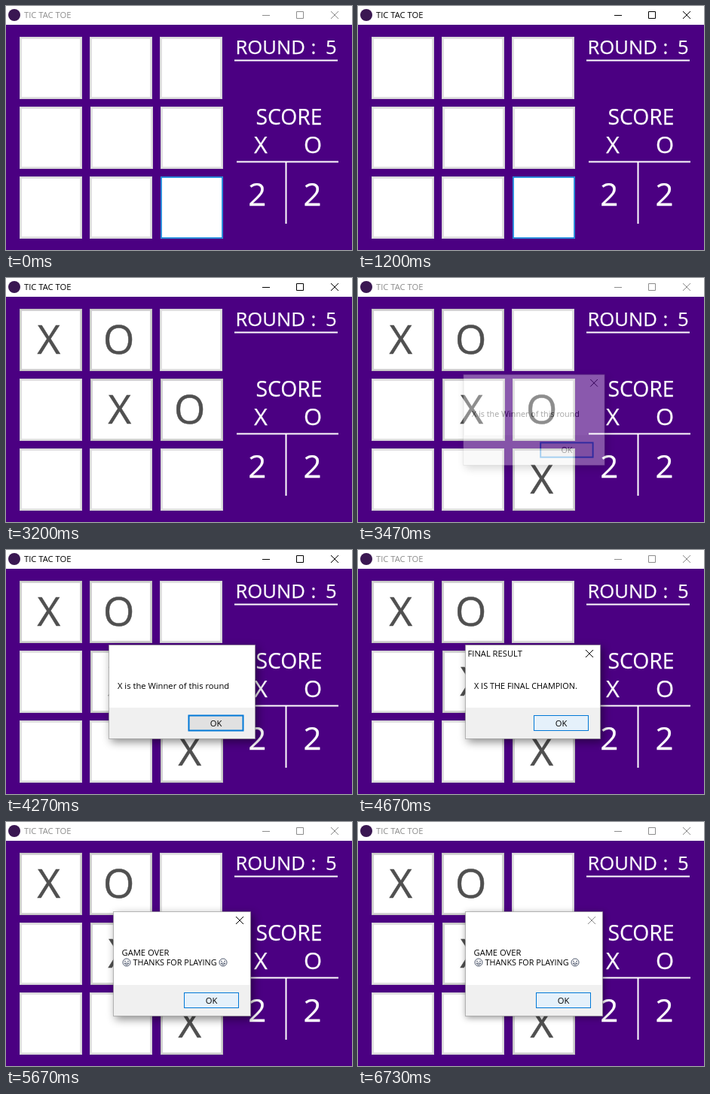
Recreate the animation shown at these times as an HTML page. Size 459 by 325 pixels, loop 6.79 s.

```html
<!DOCTYPE html>
<html lang="en">
<head>
<meta charset="utf-8">
<title>TIC TAC TOE</title>
<style>
html, body { margin: 0; width: 100%; height: 100%; overflow: hidden; background: #4b0082; }
svg { display: block; width: 459px; height: 325px; font-family: "Open Sans", "Noto Sans", sans-serif; }
.small { font-size: 11.2px; }
.mark { font-size: 53px; fill: #505050; stroke: #505050; stroke-width: .5; text-anchor: middle; }
.board { fill: #fff; stroke: #fff; stroke-width: .25; }
.mid { text-anchor: middle; }
.dialog { filter: drop-shadow(3px 4px 6px rgba(0, 0, 0, .45)); }
</style>
</head>
<body>
<svg id="stage" viewBox="0 0 459 325"></svg>
<script>
const stage = document.getElementById('stage');
const LOOP = 6790;
const TICK = 200 / 3;

function add(parent, tag, attrs = {}, text) {
  const el = document.createElementNS('http://www.w3.org/2000/svg', tag);
  for (const k in attrs) el.setAttribute(k, attrs[k]);
  if (text) el.textContent = text;
  parent.append(el);
  return el;
}
const rect = (p, x, y, width, height, fill, more) =>
  add(p, 'rect', { x, y, width, height, fill, ...more });
const label = (p, x, y, text, cls, more) =>
  add(p, 'text', { x, y, class: cls, ...more }, text);
const cross = (p, x, y, r = 5) =>
  add(p, 'path', { d: `M${x - r} ${y - r}l${2 * r} ${2 * r}m0 ${-2 * r}l${-2 * r} ${2 * r}`, fill: 'none', stroke: '#000' });

// Window
rect(stage, 0, 0, 459, 325, '#4b0082');
rect(stage, 0, 0, 459, 25, '#fff');
add(stage, 'circle', { cx: 11, cy: 12, r: 8, fill: '#3a1752' });
const caption = label(stage, 24, 16, 'TIC TAC TOE', 'small');
const controls = add(stage, 'g', { fill: 'none' });
add(controls, 'path', { d: 'M340 12.5h10M385.5 7.5h9v9h-9z' });
cross(controls, 436, 12).removeAttribute('stroke');

// Board
const cells = [
  [18, 41, 'X', 1270, 1400, 1670],
  [111, 41, 'O', 1870, 1800, 2000],
  [204, 41],
  [18, 134],
  [112, 134, 'X', 2270, 2270, 2470],
  [205, 134, 'O', 2730, 2930, 3130],
  [18, 227],
  [111, 227],
  [205, 227, 'X', 3270, 3200, 3400]
].map(([x, y, sign, hover, from, to]) => {
  const edge = rect(stage, x + .5, y + .5, 82, 82, '#e1e1e1');
  rect(stage, x + 3, y + 3, 77, 77, '#fff');
  const mark = sign && label(stage, x + 38.7, y + 60, sign, 'mark');
  return { edge, mark, hover, from, to };
});
const focus = rect(stage, 206, 228, 81, 81, '#fff', { stroke: '#0078d7', 'stroke-width': 1.6 });

// Score panel
const board = (x, y, size, text, more) => label(stage, x, y, text, 'board', { 'font-size': size, ...more });
const centred = { 'text-anchor': 'middle' };
board(304.5, 64, 25.6, 'ROUND');
board(408, 64, 25.6, ':', centred);
board(431.3, 64, 25.6, '5', centred);
board(375.5, 158, 28.3, 'SCORE', centred);
board(338, 196, 31, 'X', centred);
board(407, 196, 31, 'O', centred);
board(333.3, 266, 42, '2', centred);
board(406.5, 266, 42, '2', centred);
add(stage, 'path', { d: 'M303 72.5H440M306 207.5H441M371.5 207V290', stroke: '#fff', 'stroke-width': 2 });

// Dialogs
function dialog(x, y, w, h, closeY, button) {
  const g = add(stage, 'g', { class: 'dialog' });
  rect(g, x + .5, y + .5, w - 1, h - 1, '#fff', { stroke: '#8a8a8a', 'stroke-opacity': .6 });
  rect(g, x + 1, y + h - 42, w - 2, 41, '#f0f0f0');
  const close = cross(g, x + w - 15, closeY);
  const by = y + h - 32;
  const b = rect(g, button + .5, by + .5, 72, 20, '#e5f1fb', { stroke: '#0078d7' });
  label(g, button + 36.5, by + 14.8, 'OK', 'small mid');
  return { g, close, b, cx: x + w / 2, cy: y + h / 2 };
}
function smiley(p, x, y) {
  const g = add(p, 'g', { transform: `translate(${x} ${y})`, fill: 'none', stroke: '#39445c', 'stroke-width': .9 });
  add(g, 'circle', { r: 5 });
  add(g, 'path', { d: 'M-3-1.2q1-1.5 2 0M1-1.2q1-1.5 2 0M-3 1q3 4.5 6 0z' });
}

const round = dialog(136, 126, 195, 126, 138, 242);
round.b.setAttribute('fill', '#e1e1e1');
round.b.setAttribute('stroke-width', 2);
label(round.g, 148, 185, 'X is the Winner of this round', 'small');

const final = dialog(142, 126, 180, 126, 138, 233);
label(final.g, 145.5, 142, 'FINAL RESULT', 'small');
label(final.g, 154, 185, 'X IS THE FINAL CHAMPION.', 'small', { style: 'font-size:10.9px' });

const over = dialog(142, 119, 183, 140, 131, 236);
label(over.g, 153.5, 178, 'GAME OVER', 'small');
label(over.g, 168.5, 191, 'THANKS FOR PLAYING', 'small', { style: 'font-size:10.8px' });
smiley(over.g, 160, 187);
smiley(over.g, 288, 187);

// Touch feedback
const grad = add(add(stage, 'defs'), 'radialGradient', { id: 'touch', cx: .4, cy: .65, r: .65 });
add(grad, 'stop', { offset: 0, 'stop-color': '#f4f4f4', 'stop-opacity': .3 });
add(grad, 'stop', { offset: 1, 'stop-color': '#b8b8b8', 'stop-opacity': .34 });
const touch = add(stage, 'circle', { r: 28, fill: 'url(#touch)' });

const ramp = (t, a, b) => Math.min(1, Math.max(0, (t - a) / (b - a)));
const within = (t, a, b) => t >= a && t < b;
const show = (el, v) => el.setAttribute('opacity', v);

function pose(d, alpha) {
  const s = .935 + .065 * Math.min(1, alpha * 1.3);
  d.g.setAttribute('display', alpha > 0 ? 'inline' : 'none');
  show(d.g, alpha);
  d.g.setAttribute('transform', `translate(${d.cx} ${d.cy}) scale(${s}) translate(${-d.cx} ${-d.cy})`);
}

function draw(ms) {
  // The screen refreshes fifteen times a second
  const t = Math.round(Math.floor((ms + 4) / TICK) * TICK / 10) * 10;

  const active = within(t, 1200, 3470) || within(t, 4270, 4400) || within(t, 5400, 5470);
  caption.setAttribute('fill', active ? '#000' : '#8c8c8c');
  controls.setAttribute('stroke', active ? '#000' : '#8c8c8c');
  show(focus, t < 1270 ? 1 : 0);

  for (const c of cells) {
    const dark = c.mark && t >= c.hover;
    c.edge.setAttribute('fill', dark ? '#d2d2d2' : '#e1e1e1');
    c.edge.setAttribute('stroke', dark ? '#bdbdbd' : '#cfcbd4');
    if (c.mark) show(c.mark, ramp(t, c.from, c.to));
  }

  pose(round, t < 4270 ? ramp(t, 3400, 3600) : 1 - ramp(t, 4270, 4470));
  show(round.close, t < 4270 ? 1 : 0);
  pose(final, t < 5400 ? ramp(t, 4400, 4670) : 1 - ramp(t, 5370, 5510));
  pose(over, ramp(t, 5400, 5650));
  over.close.setAttribute('stroke', t >= 6730 ? '#8c8c8c' : '#000');
  over.g.style.filter = t >= 6730 ? 'drop-shadow(1px 2px 4px rgba(0,0,0,.4))' : '';

  const late = t > 4000;
  touch.setAttribute('cx', late ? 277 : 169);
  touch.setAttribute('cy', late ? 237 : 96.5);
  show(touch, late
    ? ramp(t, 5370, 5440) * (1 - ramp(t, 5470, 5670))
    : ramp(t, 1930, 2070) * (1 - ramp(t, 2070, 2270)));
}

const start = performance.now();
function loop() {
  draw((performance.now() - start) % LOOP);
  requestAnimationFrame(loop);
}
draw(0);
requestAnimationFrame(loop);
</script>
</body>
</html>
```
